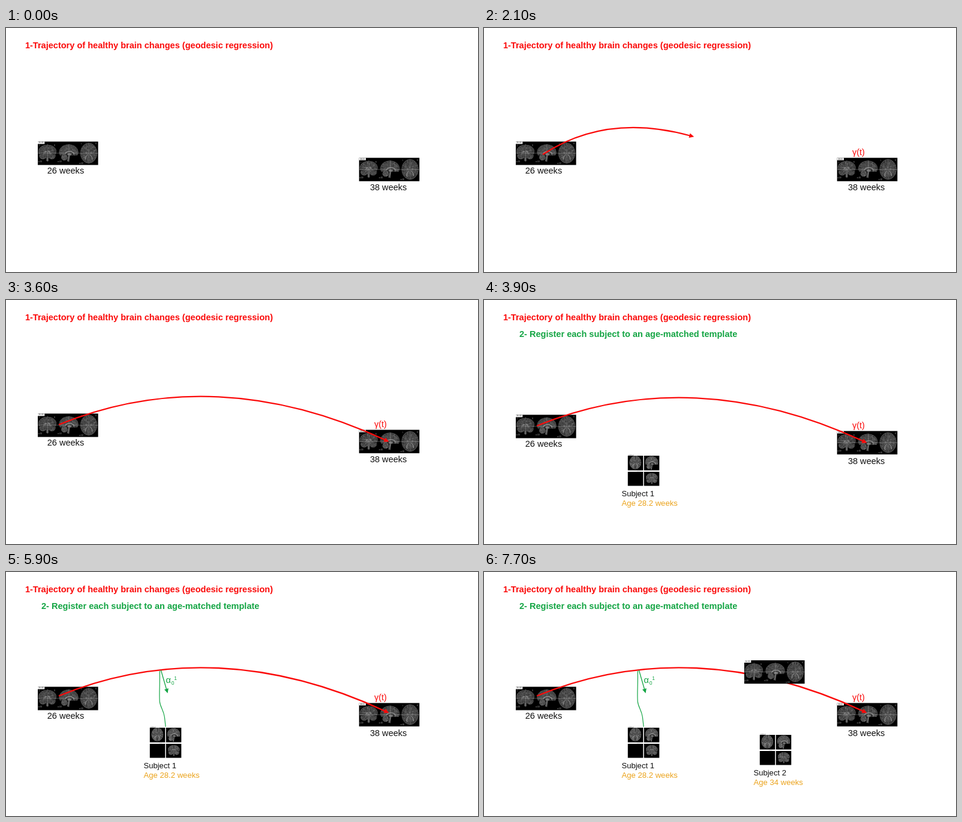
These frames come from a looping animation (787 by 409 pixels, 8000 ms). An HTML page with a canvas:

```html
<!DOCTYPE html>
<html lang="en">
<head>
<meta charset="utf-8">
<title>Geodesic regression</title>
<style>
html, body { margin: 0; width: 787px; height: 409px; overflow: hidden; background: #fff; }
canvas { display: block; }
</style>
</head>
<body>
<canvas id="stage" width="787" height="409"></canvas>
<script>
const ctx = document.getElementById('stage').getContext('2d');
const LOOP = 8000;
const RED = '#fb0a0a', GREEN = '#14a544', ORANGE = '#eba31c', INK = '#111';
const SANS = '"Liberation Sans", Arial, sans-serif';

const gray = v => `rgb(${v},${v},${v})`;
const mix = (a, b, k) => a + (b - a) * k;

function seeded(seed) {
  let s = seed * 7919 + 17;
  return () => (s = (s * 16807) % 2147483647) / 2147483647;
}

function text(str, x, y, size, color, weight = 'normal') {
  ctx.font = `${weight} ${size}px ${SANS}`;
  ctx.fillStyle = color;
  ctx.fillText(str, x, y);
}

function line(color, width, ...pts) {
  ctx.strokeStyle = color;
  ctx.lineWidth = width;
  ctx.beginPath();
  pts.forEach(([x, y], i) => i ? ctx.lineTo(x, y) : ctx.moveTo(x, y));
  ctx.stroke();
}

function oval(x, y, rx, ry, fill, stroke, width = 0.7, turn = 0) {
  ctx.beginPath();
  ctx.ellipse(x, y, rx, ry, turn, 0, Math.PI * 2);
  if (fill) { ctx.fillStyle = fill; ctx.fill(); }
  if (stroke) { ctx.strokeStyle = stroke; ctx.lineWidth = width; ctx.stroke(); }
}

// An oval of tissue: soft mottling inside, dark furrows running in from the rim.
function tissue(x, y, rx, ry, seed, folds, base = 72) {
  const rnd = seeded(seed);
  oval(x, y, rx, ry, gray(base));
  ctx.save();
  ctx.clip();
  for (let i = 0; i < folds; i++) {
    const a = rnd() * 6.28, r = Math.sqrt(rnd()) * 0.9;
    oval(x + Math.cos(a) * r * rx, y + Math.sin(a) * r * ry, 1 + rnd(), 0.5 + rnd() * 0.4,
      gray(Math.round(base - 24 + rnd() * 58)), null, 0, a);
  }
  for (let i = 0; i < folds / 4; i++) {
    const a = i / folds * 4 * 6.28 + rnd() * 0.2, c = Math.cos(a), s = Math.sin(a), r = 0.72 + rnd() * 0.15;
    line(gray(26), 0.6, [x + c * rx, y + s * ry], [x + c * r * rx, y + s * r * ry]);
  }
  ctx.restore();
  oval(x, y, rx - 0.3, ry - 0.3, null, gray(base + 20), 0.5);
}

function coronal(x, y, rx, ry, seed, folds, base) {
  line(gray(85), rx * 0.24, [x, y + ry * 0.4], [x, y + ry * 1.05]);
  for (const s of [-1, 1]) tissue(x + s * rx * 0.5, y + ry * 0.4, rx * 0.4, ry * 0.42, seed + s, folds / 4, base);
  tissue(x, y - ry * 0.15, rx, ry * 0.82, seed + 4, folds, base);
  line(gray(24), 0.8, [x, y - ry], [x, y - ry * 0.3]);
  for (const s of [-1, 1]) {
    oval(x + s * rx * 0.2, y - ry * 0.12, rx * 0.14, ry * 0.1, gray(125), null, 0, s * 0.5);
    line(gray(28), 0.9, [x + s * rx * 0.95, y + ry * 0.2], [x + s * rx * 0.5, y + ry * 0.12]);
  }
}

function sagittal(x, y, rx, ry, seed, folds, base = 72) {
  line(gray(base + 15), rx * 0.2, [x + rx * 0.08, y + ry * 0.1], [x - rx * 0.08, y + ry * 0.98]);
  ctx.save();
  ctx.beginPath();
  ctx.rect(x - rx - 1, y - ry - 1, rx * 2 + 2, ry * 1.35);
  ctx.clip();
  tissue(x, y - ry * 0.1, rx, ry * 0.88, seed, folds, base);
  ctx.restore();
  oval(x + rx * 0.1, y + ry * 0.13, rx * 0.42, ry * 0.2, gray(40));
  ctx.beginPath();
  ctx.ellipse(x + rx * 0.1, y + ry * 0.1, rx * 0.45, ry * 0.27, 0, Math.PI, Math.PI * 2.1);
  ctx.strokeStyle = gray(150);
  ctx.lineWidth = 1.3;
  ctx.stroke();
  oval(x + rx * 0.08, y + ry * 0.17, rx * 0.22, ry * 0.13, gray(120));
  tissue(x - rx * 0.45, y + ry * 0.52, rx * 0.32, ry * 0.34, seed + 2, folds / 4, base + 10);
}

function axial(x, y, rx, ry, seed, folds, base) {
  tissue(x, y, rx, ry, seed, folds, base);
  line(gray(28), 0.7, [x, y - ry], [x, y - ry * 0.4]);
  line(gray(28), 0.7, [x, y + ry * 0.5], [x, y + ry]);
  for (const s of [-1, 1]) {
    oval(x + s * rx * 0.28, y - ry * 0.02, rx * 0.18, ry * 0.17, gray(95), gray(48), 0.6, s * 0.4);
    line(gray(155), 1, [x + s * rx * 0.12, y + ry * 0.12], [x + s * rx * 0.36, y + ry * 0.38], [x + s * rx * 0.42, y + ry * 0.65]);
    line(gray(35), 0.8, [x + s * rx, y - ry * 0.1], [x + s * rx * 0.65, y - ry * 0.02]);
  }
}

// Three template views side by side with crosshairs.
function strip(x, y, age, folds) {
  ctx.save();
  ctx.translate(x, y);
  ctx.fillStyle = '#000';
  ctx.fillRect(0, 0, 100.6, 39.2);
  const seed = Math.round(age * 10);
  coronal(16, 18.5, 15, 13.5, seed, folds);
  sagittal(51.5, 19, 16, 14.5, seed + 10, folds);
  axial(85, 19.3, 14, 17, seed + 20, folds * 1.2);
  const hair = 'rgba(190,190,190,.55)';
  line(hair, 0.7, [0, 19.5], [100.6, 19.5]);
  for (const [cx, top, end] of [[16.3, 4, 34], [52, 4, 34], [85, 2, 37]]) line(hair, 0.6, [cx, top], [cx, end]);
  text('x=50', 0.5, 34.5, 3, '#aaa');
  text('x=50', 33, 34.5, 3, '#aaa');
  text('z=50', 69, 37.5, 3, '#aaa');
  for (const [s, cx] of [['L', 2], ['R', 27], ['L', 72], ['R', 96]]) text(s, cx, 8 - (cx > 50) * 3, 3, '#888');
  ctx.fillStyle = '#fff';
  ctx.fillRect(0, 0, 11.3, 4);
  text(age.toFixed(2), 1.2, 3, 3.4, '#333');
  ctx.restore();
}

function subject(x, y, n, age) {
  ctx.save();
  ctx.translate(x, y);
  ctx.fillStyle = '#000';
  for (const [px, py, h] of [[0, 1, 24.5], [27, 1, 24.5], [0, 28, 23.5], [27, 28, 23.5]]) ctx.fillRect(px, py, 25.5, h);
  axial(12.5, 12.3, 9.8, 11.2, n * 40, 60, 88);
  sagittal(39.8, 13, 10.7, 11.5, n * 40 + 5, 55, 84);
  coronal(40, 39, 9.8, 9, n * 40 + 9, 50, 84);
  text('subject', 0.5, 1, 3, '#777');
  text('view', 15, 27.2, 2.6, '#999');
  ctx.restore();
  text('Subject ' + n, x - 10.4, y + 69, 13.1, INK);
  text(`Age ${age} weeks`, x - 10.2, y + 85, 13.1, ORANGE);
}

// Fills an arrow head and returns the point where its shaft ends.
function head(tx, ty, dx, dy, len, half, color) {
  const d = Math.hypot(dx, dy), ux = dx / d, uy = dy / d;
  const bx = tx - ux * len, by = ty - uy * len;
  ctx.fillStyle = color;
  ctx.beginPath();
  ctx.moveTo(tx, ty);
  ctx.lineTo(bx - uy * half, by + ux * half);
  ctx.lineTo(bx + uy * half, by - ux * half);
  ctx.fill();
  return [bx + ux, by + uy];
}

// Cubic curves: first, middle and complete trajectory.
const SHORT = [108, 217, 122, 176, 146, 158, 200, 165];
const MIDDLE = [88, 207, 218, 153, 356, 152, 500.5, 199.7];
const WHOLE = [88, 209, 260, 138, 445, 147, 638.5, 237.5];

function trajectory(step, dy) {
  const c = SHORT.map((v, i) => step < 4
    ? mix(v, MIDDLE[i], step / 4)
    : mix(MIDDLE[i], WHOLE[i], (step - 4) / 3));
  ctx.save();
  ctx.translate(0, dy);
  const [ex, ey] = head(c[6], c[7], c[6] - c[4], c[7] - c[5], 8, 3.9, RED);
  ctx.strokeStyle = RED;
  ctx.lineWidth = 2.3;
  ctx.beginPath();
  ctx.moveTo(c[0], c[1]);
  ctx.bezierCurveTo(c[2], c[3], c[4], c[5], ex, ey);
  ctx.stroke();
  ctx.restore();
}

function registration() {
  ctx.strokeStyle = GREEN;
  ctx.lineWidth = 1.2;
  ctx.beginPath();
  ctx.moveTo(256.3, 166);
  ctx.bezierCurveTo(257, 186, 255.2, 200, 256.2, 217);
  ctx.bezierCurveTo(257.3, 227, 262.5, 231, 264.3, 243);
  ctx.lineTo(266.2, 259.5);
  ctx.stroke();
  line(GREEN, 1.3, [258.3, 164.5], head(269.5, 203.3, 11.2, 38.8, 7.5, 3.6, GREEN));
  text('α', 266.5, 186, 14.6, GREEN);
  text('0', 275.7, 188.5, 8.5, GREEN);
  text('1', 280.3, 181, 8.5, GREEN);
}

function draw(t) {
  const second = t >= 3900, dy = second ? 2 : 0;
  ctx.fillStyle = '#fff';
  ctx.fillRect(0, 0, 787, 409);

  text('1-Trajectory of healthy brain changes (geodesic regression)', 31.9, 34, 14.56, RED, 'bold');
  if (second) text('2- Register each subject to an age-matched template', 59, 62, 14.54, GREEN, 'bold');

  strip(53, 190.4 + dy, 26, 80);
  strip(588.7, 217.6 + dy, 38, 130);
  text('26 weeks', 68.7, 244 + dy, 14.56, INK);
  text('38 weeks', 606.9, 271.7 + dy * 1.8, 14.56, INK);

  if (second) subject(239.8, 260, 1, '28.2');
  if (t >= 6900) subject(459.8, 272, 2, '34');

  if (t >= 1500) {
    const step = Math.min(7, Math.floor((t - 1500) / 300));
    trajectory(step, t >= 5900 ? -1.3 : dy);
    text('γ(t)', 613.9, 213 + dy, 14.56, RED);
  }
  if (t >= 5900) registration();
  if (t >= 5100 && t < 5900) strip(210, 133, 28.2, 90);
  if (t >= 7700) strip(434, 148, 34, 115);
}

const start = performance.now();
function tick() {
  draw((performance.now() - start) % LOOP);
  requestAnimationFrame(tick);
}
tick();
</script>
</body>
</html>
```
